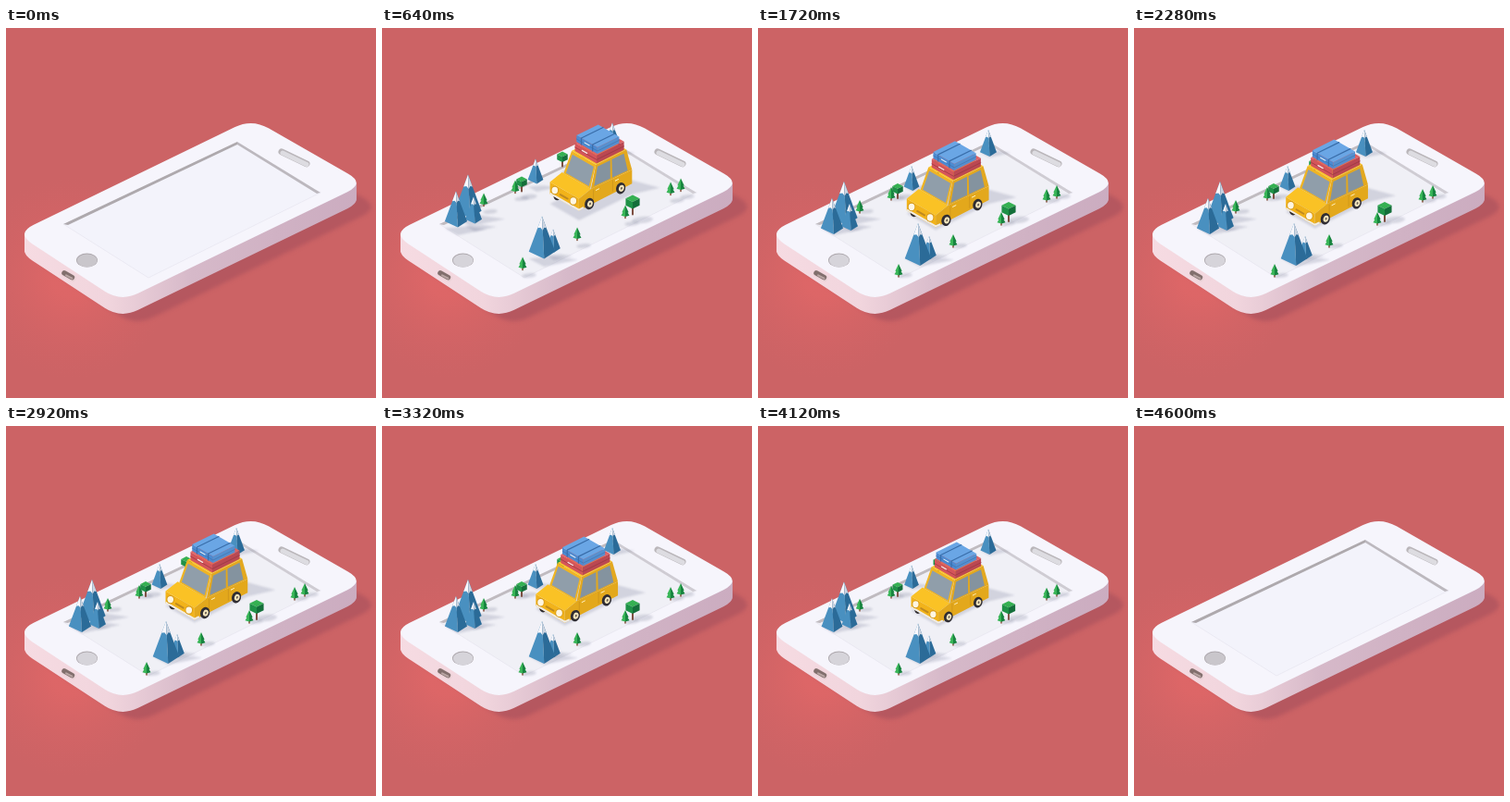
These frames come from a looping animation (400x400 px, 4.64 s). An HTML page with a canvas:

```html
<!DOCTYPE html>
<html lang="en">
<head>
<meta charset="utf-8">
<title>Pocket road trip</title>
<style>
html, body { margin: 0; width: 100%; height: 100%; overflow: hidden; background: #cc6466; }
canvas { display: block; width: 100vmin; height: 100vmin; }
</style>
</head>
<body>
<canvas id="stage"></canvas>
<script>
const LOOP = 4640, STEP = 40;
const canvas = document.getElementById('stage');
const c = canvas.getContext('2d');

const clamp = v => Math.max(0, Math.min(1, v));
const ramp = (t, from, to) => clamp((t - from) / (to - from));
const smooth = v => v * v * (3 - 2 * v);
const mix = (a, b, k) => a.map((v, i) => v + (b[i] - v) * k);
const shift = ([x, y], dx, dy) => [x + dx, y + dy];

function trace(points) {
  c.beginPath();
  points.forEach(p => c.lineTo(...p));
}

function poly(color, ...points) {
  trace(points);
  c.closePath();
  c.fillStyle = color;
  c.fill();
}

function line(color, width, ...points) {
  trace(points);
  c.strokeStyle = color;
  c.lineWidth = width;
  c.lineCap = c.lineJoin = 'round';
  c.stroke();
}

function oval(color, [x, y], rx, ry, turn = 0) {
  c.beginPath();
  c.ellipse(x, y, rx, ry, turn, 0, Math.PI * 2);
  c.fillStyle = color;
  c.fill();
}

function soft(blur, draw) {
  c.save();
  c.filter = `blur(${blur * canvas.width / 400}px)`;
  draw();
  c.restore();
}

function shade(gradient, ...colors) {
  colors.forEach((color, i) => gradient.addColorStop(i / (colors.length - 1), color));
  return gradient;
}

// Phone: corners run left, back, right, front.
const FACE = [[11, 222], [266, 98], [388, 168], [124, 296]];
const SCREEN = [[62, 212], [250, 123], [340, 178], [154, 270]];
const DEPTH = 18, ROUND = 21;

function slab(color, dx, dy) {
  const toward = (a, b) => mix(a, b, ROUND / Math.hypot(b[0] - a[0], b[1] - a[1]));
  c.save();
  c.translate(dx, dy);
  c.beginPath();
  FACE.forEach((corner, i) => {
    c.lineTo(...toward(corner, FACE[(i + 3) % 4]));
    c.quadraticCurveTo(...corner, ...toward(corner, FACE[(i + 1) % 4]));
  });
  c.fillStyle = color;
  c.fill();
  c.restore();
}

function pill(color, width, center, dx, dy) {
  line(color, width, shift(center, -dx, -dy), shift(center, dx, dy));
}

function phone(filled) {
  c.fillStyle = '#cc6365';
  c.fillRect(0, 0, 400, 400);
  c.fillStyle = shade(c.createRadialGradient(70, 270, 20, 70, 270, 110), 'rgba(232,104,104,.6)', 'rgba(216,100,102,0)');
  c.fillRect(0, 0, 400, 400);
  soft(2, () => slab('rgba(176,84,94,.8)', 16, 26));

  const side = shade(c.createLinearGradient(19, 0, 382, 0), '#f6dbe2', '#f1d5dd', '#d6b9c9', '#d0b2c4', '#cbacc0');
  for (let dy = DEPTH; dy > 0; dy--) slab(side, 0, dy);
  slab('#f6f5fc', 0, 0);

  const [left, back, right, front] = SCREEN;
  poly(filled ? '#f0f0f6' : '#f3f3fb', ...SCREEN);
  poly(filled ? '#c0bbc0' : '#aea9ad', left, back, shift(back, 0, 3), shift(left, 5, 1));
  poly(filled ? '#cfccd3' : '#bcb8be', back, right, shift(right, -4, 1), shift(back, 0, 3));
  line('rgba(222,218,230,.7)', .6, left, front, right);

  pill('#bab6ba', 7, [311.5, 140.3], 13.5, 6.5);
  pill('#dddce1', 5, [312, 141.3], 13, 6.3);
  oval('#adA8ad', [87.5, 251], 11.5, 7.6);
  oval(filled ? '#d6d4da' : '#c9c6cb', [87.7, 251.5], 10.8, 6.9);
  pill('#ecd3d8', 7.5, [67.7, 268], 4.2, 2.5);
  pill('#826f6d', 5.5, [67.2, 267.2], 4.2, 2.4);
  pill('#b9a5a3', 2, [68.2, 269], 3.2, 1.7);
}

// Props stand on the local origin.
const mountainWidth = h => h * .62;

function mountain(h) {
  const w = mountainWidth(h), top = [0, -h];
  const base = [[-w / 2, -w * .27], [w * .08, 0], [w / 2, -w * .27]];
  const face = (rock, snow, a, b) => {
    poly(rock, top, a, b);
    poly(snow, top, mix(top, a, .33), mix(top, mix(a, b, .5), .29), mix(top, b, .33));
  };
  face('#4990c0', '#faf8fc', base[0], base[1]);
  face('#2b6b98', '#ced5e1', base[1], base[2]);
}

function pine(h) {
  line('#8a5642', 1.6, [0, 0], [0, -h * .3]);
  for (const tier of [0, 1]) {
    const r = h * (.32 - tier * .06), y = -h * (.2 + tier * .25);
    const top = [0, -h * (.75 + tier * .25)], front = [0, y + h * .1];
    poly('#38b557', top, [-r, y], front);
    poly('#17843f', top, front, [r, y]);
  }
}

function bush(h) {
  const r = h * .36, q = r * .5, wall = h * .36;
  const top = [0, -h], left = [-r, q - h], right = [r, q - h], near = [0, 2 * q - h];
  line('#7c4e40', 2, [0, 0], [0, -h * .4]);
  poly('#35b052', top, right, near, left);
  poly('#1f9147', left, near, shift(near, 0, wall), shift(left, 0, wall));
  poly('#146f3a', near, right, shift(right, 0, wall), shift(near, 0, wall));
}

// Car space: x toward the tail, y across to the visible flank, z up.
const LENGTH = 66, WIDTH = 36, BELT = 20, ROOF = 41;
const P = (x, y, z) => [.87 * (x + y) - 45.3, .5 * y - .43 * x - z - 1.5];

function prism(x0, x1, y0, y1, z0, z1, top, front, flank) {
  poly(top, P(x0, y0, z1), P(x1, y0, z1), P(x1, y1, z1), P(x0, y1, z1));
  poly(front, P(x0, y0, z0), P(x0, y1, z0), P(x0, y1, z1), P(x0, y0, z1));
  poly(flank, P(x0, y1, z0), P(x1, y1, z0), P(x1, y1, z1), P(x0, y1, z1));
}

// Panel with glass between the fractions in each [from, to] pair.
function glazed(frame, glass, corners, panes) {
  const [bl, br, tr, tl] = corners;
  const at = (u, v) => mix(mix(bl, br, u), mix(tl, tr, u), v);
  poly(frame, ...corners);
  for (const [a, b] of panes) poly(glass, at(a, .06), at(b, .06), at(b, .88), at(a, .88));
}

function wheel(x) {
  const hub = P(x, WIDTH, 5);
  oval('#2f2d33', hub, 5, 6.3, .3);
  oval('#f4e6bd', shift(hub, .7, .1), 2.8, 3.6, .3);
  oval('#6a6058', shift(hub, .8, .1), 1, 1.4, .3);
}

function luggage() {
  prism(26, 60, 5, 32, ROOF, 50, '#e06265', '#d4555a', '#bb4852');
  line('#93353f', .7, P(26, 5, 45), P(26, 32, 45), P(60, 32, 45));
  line('#f6e4e2', 1.3, P(26, 14, 46), P(26, 20, 46));
  prism(28, 55, 5, 31, 50, 57, '#6aa6e5', '#4c8bd2', '#5690cf');
  for (const y of [11, 25]) line('#396da9', 1.2, P(55, y, 57), P(28, y, 57), P(28, y, 50));
  line('#396da9', .6, P(28, 5, 53), P(28, 31, 53), P(55, 31, 53));
  line('#dfeaf6', 1.1, P(28, 15, 54), P(28, 21, 54));
}

function car() {
  const rim = x => [P(x, 3, ROOF), P(x, WIDTH - 3, ROOF)];
  const [frontLeft, frontRight] = rim(24), [backLeft, backRight] = rim(62);
  oval('#2f2d33', P(4, 5, 2), 4, 5);
  poly('#e3a81c', P(0, WIDTH, 3), P(0, WIDTH, 16), P(15, WIDTH, BELT),
    P(LENGTH, WIDTH, BELT - 1), P(LENGTH, WIDTH, 4));
  poly('#f2b31a', P(0, 0, 3), P(0, WIDTH, 3), P(0, WIDTH, 16), P(0, 0, 16));
  poly('#fac225', P(0, 0, 16), P(0, WIDTH, 16), P(15, WIDTH, BELT), P(15, 0, BELT));
  poly('#fcc82d', frontLeft, backLeft, backRight, frontRight);
  glazed('#efb423', '#909eaa', [P(15, 2, BELT), P(15, WIDTH - 1, BELT), frontRight, frontLeft], [[.07, .94]]);
  glazed('#e3a81f', '#84939f', [P(15, WIDTH, BELT), P(LENGTH, WIDTH, BELT - 1), backRight, frontRight],
    [[.07, .47], [.52, .9]]);
  for (const x of [18, 42]) {
    line('#c48d1c', .6, P(x, WIDTH, 18), P(x, WIDTH, 6));
    line('#fff0c0', 1, P(x + 3, WIDTH, 16), P(x + 7, WIDTH, 16));
  }
  line('#bf8a20', 2, P(0, 13, 9), P(0, 22, 9));
  line('#f0ece7', 2, P(0, 1, 4), P(0, WIDTH, 4), P(5, WIDTH, 4));
  for (const y of [6, 29]) {
    oval('#d49a1c', P(0, y, 10), 4.2, 4.7);
    oval('#fff6e2', P(0, y, 10), 3.3, 3.7);
  }
  [13, 52].forEach(wheel);
  luggage();
}

const kinds = [
  [mountain, [[249, 139, 29], [166, 176, 27], [93, 213, 47], [99, 219, 29], [80, 223, 39], [185, 250, 25], [173, 257, 46]]],
  [bush, [[195, 157, 16], [151, 184, 16], [271, 209, 21]]],
  [pine, [[144, 186], [110, 200], [323, 184], [312, 188], [263, 213], [211, 237], [152, 269]]],
  [car, [[218, 196]]]
];
const props = kinds
  .flatMap(([draw, spots]) => spots.map(([x, y, h = 14]) => ({ draw, x, y, h })))
  .sort((a, b) => a.y - b.y);

function shadow({ draw, h }) {
  const tint = 'rgba(122,126,152,.25)';
  if (draw === car) {
    const tail = P(LENGTH, WIDTH, 0);
    poly(tint, P(0, 0, 0), P(0, WIDTH, 0), tail, shift(tail, 30, -7), shift(P(LENGTH, 0, 0), 32, 3), P(LENGTH, 0, 0));
  } else if (draw === mountain) {
    const w = mountainWidth(h);
    poly(tint, [-w / 2, -w * .27], [w * .08, 1], [h * .85, -h * .14], [w / 2, -w * .35]);
  } else {
    oval(tint, [h * .5, -1.5], h * .55, h * .17, -.1);
  }
}

function drive(t) {
  const sway = 6.5 * (Math.cos((t - 2850) / 1900 * Math.PI * 2) - 1);
  return sway + 12 * (1 - smooth(ramp(t, 640, 1340)));
}

function scene(t) {
  const grow = 1 - Math.pow(1 - ramp(t, 120, 560), 3);
  const size = grow * (1 - smooth(ramp(t, 4060, 4480)));
  const hop = 7.5 * Math.sin(Math.PI * ramp(t, 380, 900));
  phone(size > .05);
  if (size <= .01) return;

  const place = (prop, lift, draw) => {
    const dx = prop.draw === car ? drive(t) : 0;
    c.save();
    c.translate(prop.x + dx, prop.y - dx / 2 - lift);
    c.scale(size, size);
    draw(prop);
    c.restore();
  };
  soft(1.2, () => props.forEach(p => place(p, 0, shadow)));
  props.forEach(p => place(p, hop, () => p.draw(p.h)));
}

function frame(now) {
  const pixels = Math.round(Math.min(innerWidth, innerHeight) * devicePixelRatio) || 400;
  if (canvas.width !== pixels) canvas.width = canvas.height = pixels;
  c.setTransform(pixels / 400, 0, 0, pixels / 400, 0, 0);
  scene(Math.floor(now % LOOP / STEP) * STEP);
  requestAnimationFrame(frame);
}
frame(performance.now());
</script>
</body>
</html>
```
